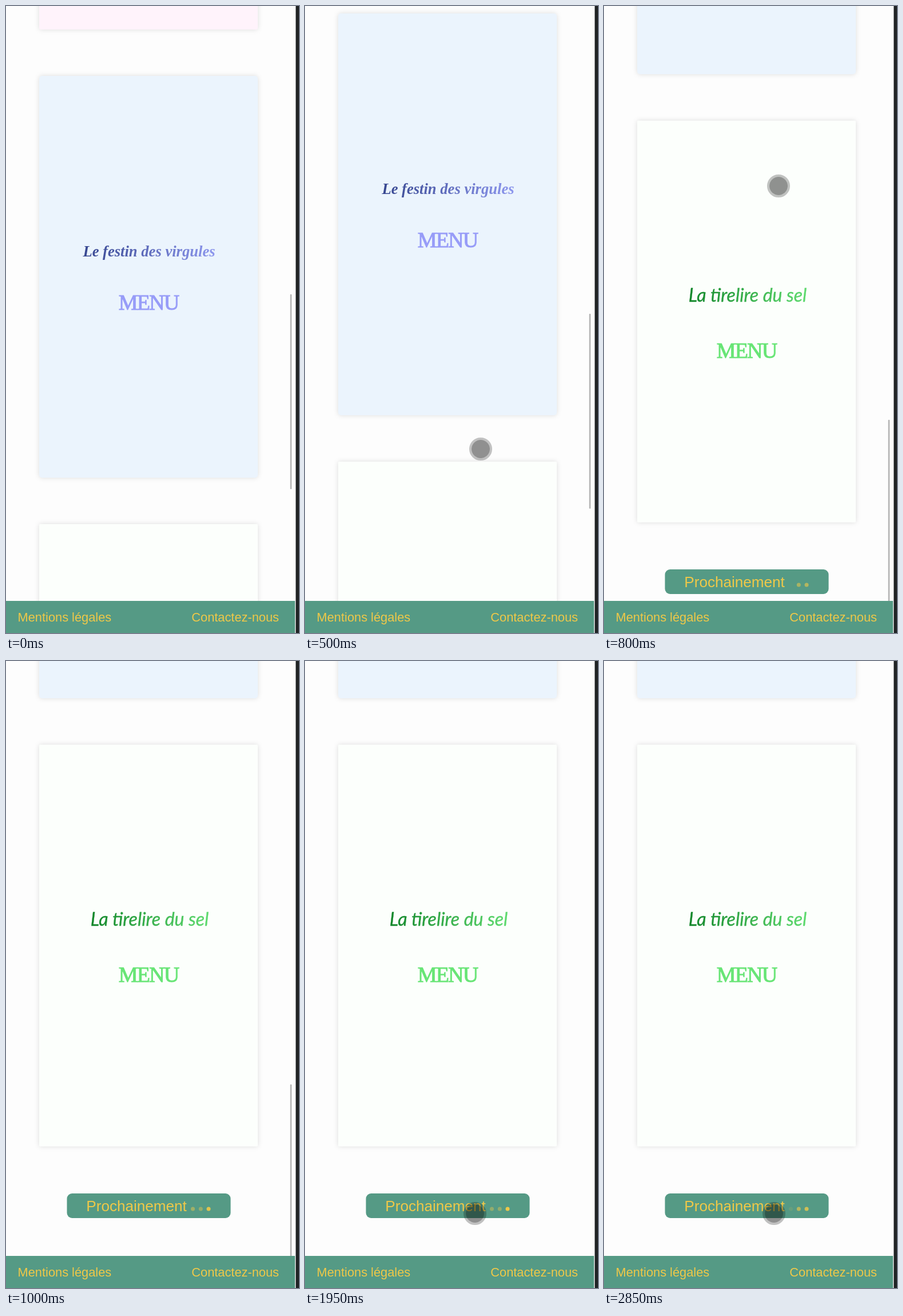
Write an HTML page that moves like this. It is 512 px wide and 1094 px high and loops after 2900 ms.

```html
<!DOCTYPE html>
<html lang="fr">
<head>
<meta charset="utf-8">
<title>Menus</title>
<style>
  html, body { margin: 0; width: 100%; height: 100%; overflow: hidden; background: #fdfdfd; }
  svg { display: block; width: 100vw; height: 100vh; }
  .card { filter: drop-shadow(0 0 4px rgba(0, 0, 0, .13)); }
  .mid { text-anchor: middle; }
  .festin { font: italic bold 26.6px "Liberation Serif", serif; fill: url(#blue); }
  .tirelire { font: italic 32px Lato, sans-serif; fill: url(#green); stroke: url(#green); stroke-width: .4; }
  .menu { font: 38px "Liberation Serif", serif; letter-spacing: -1.8px; stroke-width: 1; }
  .link { font: 21.8px "Liberation Sans", Arial, sans-serif; }
  .soon { font: 26.1px "Liberation Sans", Arial, sans-serif; }
  .gold { fill: #efc848; }
  .teal { fill: #559a85; }
</style>
</head>
<body>
<svg viewBox="0 0 512 1094" preserveAspectRatio="none">
  <defs>
    <linearGradient id="blue" gradientUnits="userSpaceOnUse" x1="134" x2="366" y1="0" y2="0">
      <stop offset="0" stop-color="#36468f"/>
      <stop offset="1" stop-color="#8d97ee"/>
    </linearGradient>
    <linearGradient id="green" gradientUnits="userSpaceOnUse" x1="145" x2="358" y1="0" y2="0">
      <stop offset="0" stop-color="#0f8428"/>
      <stop offset="1" stop-color="#60dc70"/>
    </linearGradient>
  </defs>
  <rect width="512" height="1094" fill="#fdfdfd"/>

  <g id="page">
    <rect class="card" x="58" y="-660" width="382" height="701" rx="3" fill="#fff3fb"/>

    <rect class="card" x="58" y="122" width="382" height="701" rx="5" fill="#ebf4fd"/>
    <text class="mid festin" x="250" y="437">Le festin des virgules</text>
    <text class="mid menu" x="249" y="530" fill="#979cf8" stroke="#979cf8">MENU</text>

    <rect class="card" x="58" y="904" width="382" height="701" rx="2" fill="#fcfffc"/>
    <text class="mid tirelire" x="251" y="1220">La tirelire du sel</text>
    <text class="mid menu" x="249" y="1318" fill="#68e576" stroke="#68e576">MENU</text>

    <rect class="teal" x="106.5" y="1687" width="286" height="43" rx="9"/>
    <text class="soon gold" x="140.3" y="1718">Prochainement</text>
    <g class="gold">
      <circle class="dot" cx="326.5" cy="1714" r="3.5"/>
      <circle class="dot" cx="340.3" cy="1714" r="3.5"/>
      <circle class="dot" cx="354" cy="1714" r="3.5"/>
    </g>
  </g>

  <rect id="bar" x="496.6" y="503" width="2.6" height="340" rx="1" fill="#b3b3b3"/>

  <rect class="teal" y="1038" width="505" height="56"/>
  <text class="link gold" x="20.6" y="1074">Mentions légales</text>
  <text class="link gold" x="324.3" y="1074">Contactez-nous</text>
  <rect x="506.3" width="6" height="1094" fill="#202325"/>

  <g id="touch">
    <circle r="18" fill="none" stroke="#000" stroke-opacity=".24" stroke-width="4"/>
    <circle r="16" fill="#000" fill-opacity=".43"/>
  </g>
</svg>
<script>
  const LOOP = 2900, STEP = 50, PULSE = 1000;
  const page = document.getElementById('page');
  const bar = document.getElementById('bar');
  const touch = document.getElementById('touch');
  const dots = document.querySelectorAll('.dot');

  // Each track is a list of [ms, value]
  const scroll = [[350, 0], [400, 15], [450, 52], [500, 109], [550, 205], [600, 345], [650, 488],
    [700, 585], [750, 655], [800, 704], [850, 733], [900, 749], [950, 756], [1000, 758]];
  const swipeX = [[400, 309], [500, 307], [650, 305]];
  const swipeY = [[400, 872], [450, 830], [500, 773], [550, 680], [600, 545], [650, 401], [700, 314]];
  const barFade = [[1200, 1], [1300, .6], [1400, 0]];
  const pulses = [
    [[-50, .4], [290, 1], [790, 0], [850, .12], [950, .4], [1290, 1]],
    [[-50, .4], [300, .6], [550, 1], [800, .55], [850, .62], [950, .4], [1300, .6]],
    [[-50, 1], [300, .45], [500, .2], [800, .62], [850, .8], [950, 1], [1300, .45]]
  ];

  function at(track, t) {
    if (t <= track[0][0]) return track[0][1];
    for (let i = 1; i < track.length; i++) {
      const [t0, a] = track[i - 1], [t1, b] = track[i];
      if (t <= t1) return a + (b - a) * (t - t0) / (t1 - t0);
    }
    return track[track.length - 1][1];
  }

  function draw(t) {
    const y = at(scroll, t);
    page.setAttribute('transform', `translate(0 ${-y})`);
    bar.setAttribute('y', 503 + y * .311);
    bar.setAttribute('opacity', at(barFade, t));
    dots.forEach((dot, i) => dot.setAttribute('opacity', at(pulses[i], t % PULSE)));

    const swiping = t >= 400 && t < 850;
    const pressing = t >= 1150;
    const pos = pressing ? [297, 964] : [at(swipeX, t), at(swipeY, t)];
    touch.setAttribute('transform', `translate(${pos})`);
    touch.setAttribute('visibility', swiping || pressing ? 'visible' : 'hidden');
  }

  const start = performance.now();
  function tick() {
    const t = (performance.now() - start) % LOOP;
    draw(Math.floor(t / STEP) * STEP);
    requestAnimationFrame(tick);
  }
  tick();
</script>
</body>
</html>
```
